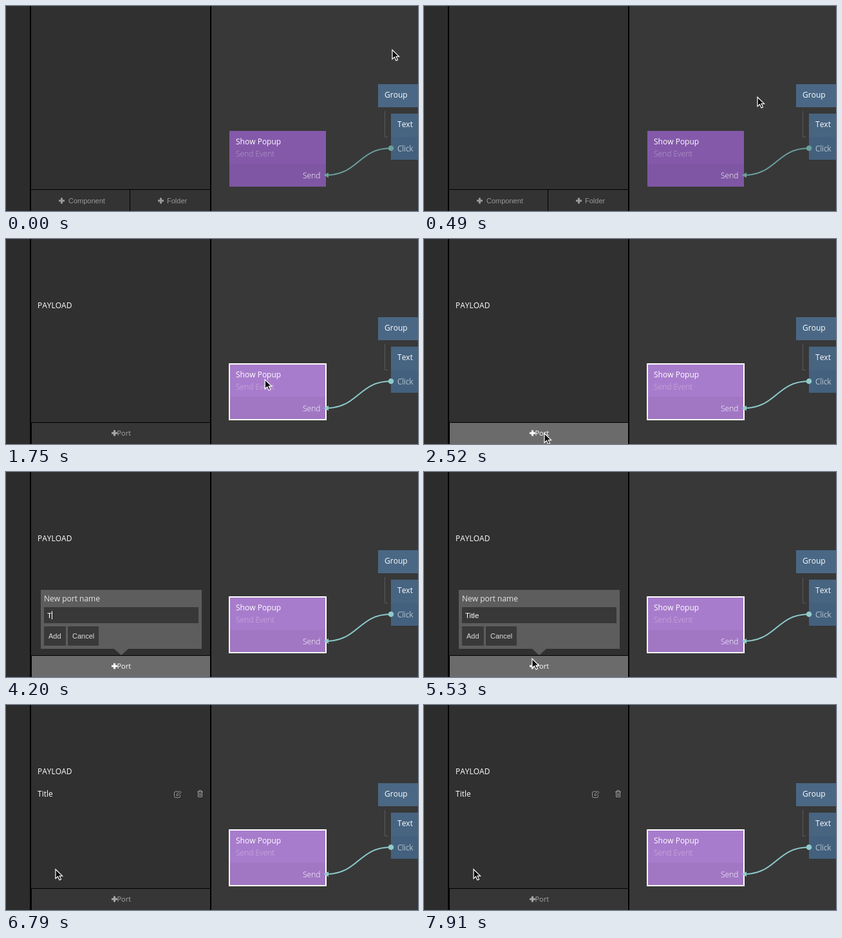
These frames come from a looping animation (640x320 px, 8.4 s). An HTML page:

```html
<!DOCTYPE html>
<html lang="en">
<head>
<meta charset="utf-8">
<title>Adding a port</title>
<style>
html, body { margin: 0; width: 100%; height: 100%; overflow: hidden; background: #383838; }
svg { display: block; width: 100vw; height: 100vh; }
text { font: 12px "Open Sans", sans-serif; font-kerning: none; fill: #fff; white-space: pre; }
.thin { font-weight: 350; }
.ui { font: 11px "Liberation Sans", Arial, sans-serif; }
.icon { fill: none; stroke: #999; }
</style>
</head>
<body>
<svg viewBox="0 0 640 320">
  <defs>
    <path id="plus" d="M-1.5-4.5h3v3h3v3h-3v3h-3v-3h-3v-3h3z"/>
  </defs>

  <!-- panels -->
  <rect width="640" height="320" fill="#383838"/>
  <rect width="37" height="320" fill="#2c2c2c"/>
  <rect x="39" width="278" height="320" fill="#303030"/>
  <path d="M38 0V320M318 0V320" stroke="#000" stroke-width="2"/>

  <g id="folderBar" fill="#999">
    <rect x="39" y="287" width="278" height="33" fill="#333"/>
    <path d="M39 286.5H317M192.5 287V320" stroke="#000"/>
    <use href="#plus" x="86.5" y="304"/>
    <use href="#plus" x="240.5" y="304"/>
    <text class="ui" x="97" y="308" style="fill:#999">Component</text>
    <text class="ui" x="250" y="308" style="fill:#999">Folder</text>
  </g>

  <g id="portPanel">
    <text x="49" y="108">PAYLOAD</text>
    <rect id="portBar" x="40" y="287" width="277" height="33"/>
    <path d="M317 286.5H39.5V320" fill="none" stroke="#000"/>
    <use id="portPlus" href="#plus" x="168.5" y="303"/>
    <text id="portText" x="172.5" y="307" style="font-size:11px">Port</text>
  </g>

  <g id="row">
    <text x="49" y="143">Title</text>
    <path class="icon" d="M268 135H263.5Q261.5 135 261.5 137V142.5Q261.5 144.5 263.5 144.5H268.5Q270.5 144.5 270.5 142.5V140.5M265 141.5L265.5 139L270 134.5L272 136.5L267.5 141Z"/>
    <path class="icon" d="M297 135.5H306M299.5 135V133.5H303.5V135M298.5 136V143.5H304.5V136M300.5 137.5V142M302.5 137.5V142"/>
  </g>

  <!-- node graph -->
  <path d="M588.5 164V204.5H593" fill="none" stroke="#5a5a5a"/>
  <rect x="578" y="122" width="62" height="36" fill="#4a6885"/>
  <rect x="598" y="168" width="42" height="72" fill="#43617e"/>
  <rect x="598" y="168" width="42" height="37" fill="#476481"/>
  <text x="588" y="143">Group</text>
  <text x="608" y="189">Text</text>
  <text class="thin" x="608" y="226.5">Click</text>

  <rect id="node" x="347" y="195" width="150" height="87"/>
  <rect x="347" y="246" width="150" height="36" opacity=".04"/>
  <text x="357" y="216">Show Popup</text>
  <text class="thin" x="357" y="235" opacity=".4">Send Event</text>
  <text class="thin" x="461" y="268.5">Send</text>
  <rect id="outline" x="347" y="195" width="150" height="87" fill="none" stroke="#fff" stroke-width="2"/>
  <g id="link">
    <path d="M598 222C547.5 222 547.5 264 497 264" fill="none" stroke="currentColor" stroke-width="2"/>
    <path d="M493.5 264L501 260V268Z" fill="currentColor"/>
    <circle cx="598" cy="222" r="4.3" fill="currentColor"/>
  </g>

  <g id="popup">
    <path d="M54 184H304V276H190L179 286L168 276H54Z" fill="#5d5d5d"/>
    <text x="59" y="202" style="fill:#e6e6e6">New port name</text>
    <rect x="59" y="211" width="240" height="25" fill="#383838"/>
    <text id="input" class="ui" x="64" y="228" style="font-size:11.5px"></text>
    <rect id="caret" y="217" width="1" height="13" fill="#fff"/>
    <rect id="add" x="59" y="241" width="34" height="30"/>
    <rect x="96" y="241" width="48" height="30" fill="#393939"/>
    <text id="addText" class="ui" x="66" y="260">Add</text>
    <text class="ui" x="103" y="260" style="fill:#ddd">Cancel</text>
  </g>

  <!-- pointer -->
  <g id="pointer">
    <g id="ring" fill="none">
      <circle cx="-.5" cy="1" r="21.3" stroke="#fff" stroke-width="2.6" opacity=".5"/>
      <circle cx="-.5" cy="1" r="21.3" stroke="#0b0b0b" stroke-width="1.2"/>
    </g>
    <path d="M0 .5V15L3.5 11.8L6 17.2L8.5 16.1L6.1 10.9H10.6Z" fill="#0a0a0a" stroke="#fff" stroke-width="1.2"/>
  </g>
</svg>
<script>
const LOOP = 8400, STEP = 70;
const $ = id => document.getElementById(id);
const ramp = (t, a, b) => Math.min(1, Math.max(0, (t - a) / (b - a)));
const ease = u => u * u * (3 - 2 * u);
const within = (t, a, b) => t >= a && t < b;
const show = (id, on) => $(id).setAttribute("visibility", on ? "inherit" : "hidden");
const fill = (id, color) => $(id).style.fill = color;
const mix = (a, b, u) => `rgb(${a.map((v, i) => Math.round(v + (b[i] - v) * u))})`;

// start, end, then the start, control and end point of a curve
const moves = [
  [0, 980, [600, 68], [520, 140], [432, 219]],
  [1540, 2473, [432, 219], [318, 213], [187, 303]],
  [5320, 6090, [187, 303], [135, 268], [79, 258]],
  [6160, 6370, [79, 258], [78, 257], [77, 256]]
];
const clicks = [[980, 1260], [2660, 2870], [6510, 6720]];
const keys = [3990, 4550, 4690, 4830, 4970];

function pointerAt(t) {
  const [a, b, p, c, q] = moves.findLast(m => t >= m[0]);
  const u = ease(ramp(t, a, b)), v = 1 - u;
  return p.map((_, i) => v * v * p[i] + 2 * u * v * c[i] + u * u * q[i]);
}

function caretOn(t) {
  if (t < keys[0]) return within(t, 3150, 3640);
  return t < keys[4] || (t - keys[4]) % 1000 < 500;
}

function draw(t) {
  const [x, y] = pointerAt(t);
  const hot = ramp(t, 680, 840);
  const selected = t >= 1330, added = t >= 6720;

  $("pointer").setAttribute("transform", `translate(${x} ${y})`);
  show("pointer", !within(t, 3920, 5320));
  show("ring", clicks.some(c => within(t, ...c)));

  fill("node", mix([132, 89, 170], [168, 124, 204], hot));
  $("link").style.color = mix([107, 160, 158], [143, 203, 204], hot);
  show("outline", selected);

  show("folderBar", !selected);
  show("portPanel", selected);
  const overPort = y > 287;
  fill("portBar", overPort ? "#6b6b6b" : "#363636");
  for (const id of ["portPlus", "portText"]) fill(id, overPort ? "#fff" : "#a6a6a6");

  const open = t >= 2800 && !added;
  show("popup", open);
  $("popup").setAttribute("opacity", ramp(t, 2730, 2940));
  show("row", added);
  const input = $("input");
  input.textContent = "Title".slice(0, keys.filter(k => t >= k).length);
  $("caret").setAttribute("x", 64 + (input.textContent ? input.getComputedTextLength() : 0));
  show("caret", open && caretOn(t));
  const overAdd = within(x, 59, 93) && within(y, 241, 271);
  fill("add", overAdd ? "#505050" : "#393939");
  fill("addText", overAdd ? "#b8b8b8" : "#ddd");
}

const start = performance.now();
function frame() {
  const t = (performance.now() - start) % LOOP;
  draw(Math.floor(t / STEP) * STEP);
  requestAnimationFrame(frame);
}
frame();
</script>
</body>
</html>
```
